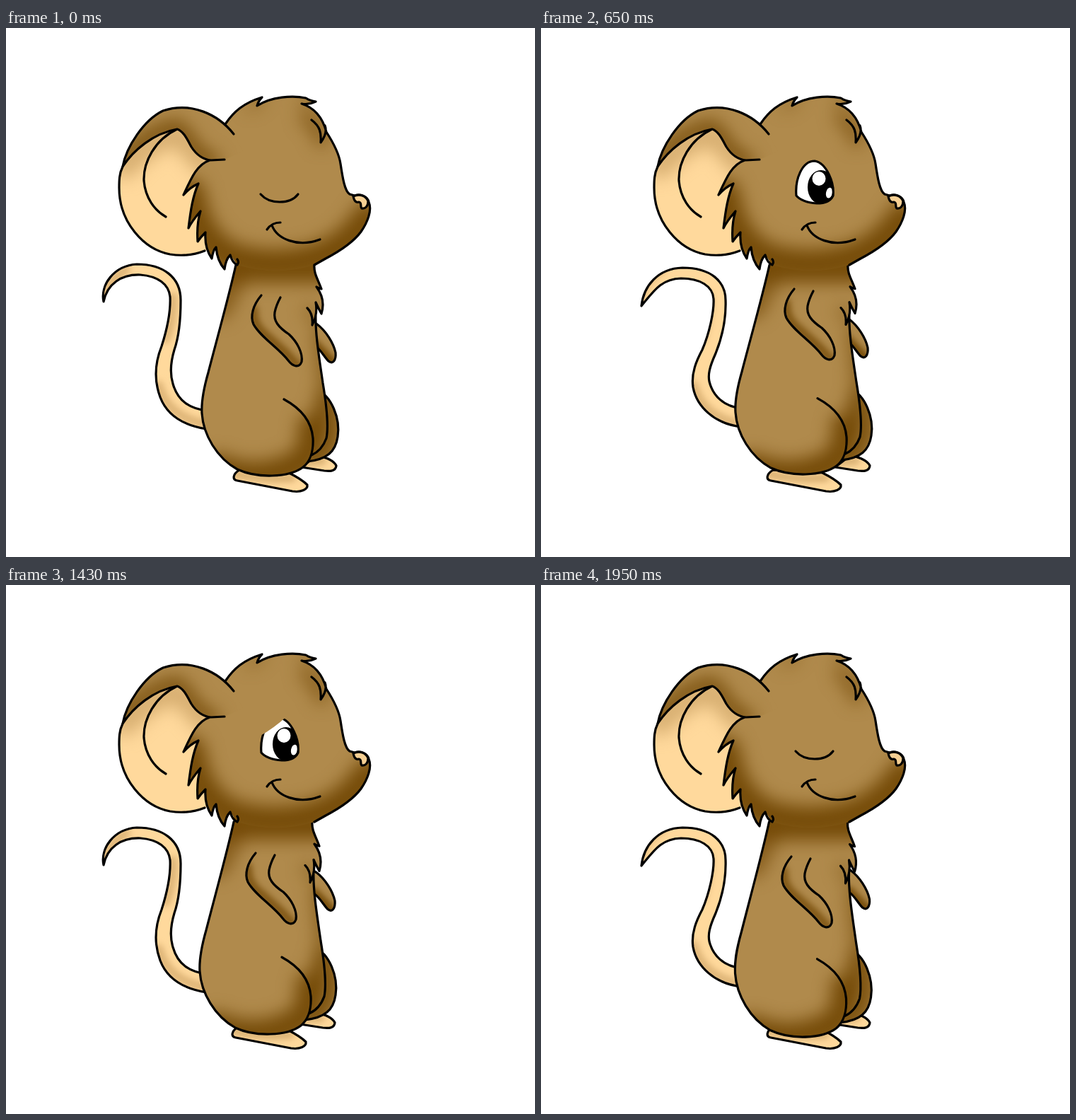
Write an HTML page that moves like this. It is 748x748 px and loops after 2080 ms.

```html
<!DOCTYPE html>
<html lang="en">
<head>
<meta charset="utf-8">
<title>Blinking mouse</title>
<style>
  html, body { margin: 0; width: 100%; height: 100%; overflow: hidden; background: #fff; }
  svg { display: block; width: 100vw; height: 100vh; }
  path, ellipse { stroke-linecap: round; stroke-linejoin: round; }
  .line { fill: none; stroke: #000; stroke-width: 3.2; }
</style>
</head>
<body>
<svg id="stage" viewBox="0 0 748 748"></svg>
<script>
const FUR = '#b08a4c', DARK = '#754b08', SKIN = '#ffd99c', TAN = '#c99f62';
const STEP = 130, COUNT = 16;
let clips = 0;

const line = d => `<path class="line" d="${d}"/>`;
const shade = (d, width, color = DARK, opacity = 1) =>
  `<path d="${d}" fill="none" stroke="${color}" stroke-width="${width}" opacity="${opacity}"/>`;
const group = (id, content) => `<g id="${id}">${content}</g>`;

// Fill and blurred shading are clipped together, then the outline goes on top.
function shape(d, fill, shades = '', outline = d, blur = 'soft') {
  const id = 'clip' + clips++;
  return `<clipPath id="${id}"><path d="${d}"/></clipPath>
    <g clip-path="url(#${id})"><rect width="748" height="748" fill="${fill}"/>
    <g filter="url(#${blur})">${shades}</g></g>${line(outline)}`;
}
const blurFilter = (id, size) =>
  `<filter id="${id}" filterUnits="userSpaceOnUse" x="0" y="0" width="748" height="748"
    color-interpolation-filters="sRGB"><feGaussianBlur stdDeviation="${size}"/></filter>`;

const tails = [
  'M284 567C250 562 228 548 218 522C208 495 212 470 220 450C228 425 233 400 232 380C230 362 215 351 190 349C163 348 143 362 138 387C133 364 152 336 185 334C222 334 247 352 247 385C247 410 245 435 238 455C232 475 232 490 236 503C243 528 260 538 284 541',
  'M284 564C245 560 220 535 215 508C212 488 220 470 228 455C238 432 245 400 244 383C243 365 225 354 198 354C170 355 160 371 142 393C145 365 165 340 200 339C240 339 261 358 261 385C262 415 255 440 247 460C238 480 236 490 238 500C243 520 258 535 284 538'
];
const tail = (d, i) => group('tail' + i, shape(d, SKIN,
  shade('M282 560Q228 550 216 505M138 388Q145 355 170 342M226 440Q238 410 236 380', 12, TAN, .65), d, 'fine'));

const farFoot = 'M440 604C455 608 464 612 467 619C466 627 458 627 450 626L418 621Z';
const nearFoot = 'M330 625C320 631 320 639 327 640L405 655C418 657 427 652 426 646C420 640 410 634 400 629Z';
const hip = 'M440 512C460 520 473 552 469 578C466 599 454 610 426 613Z';
const farArm = 'M428 412L440 419C452 428 463 445 466 459C467 470 462 476 456 471C450 465 445 455 438 450L428 445';

const tuft = 'C435 347 441 355 446 369Q442 368 439 366C448 378 450 391 446 404Q442 397 438 388';
const flank = 'C437 432 443 467 448 502C454 538 456 565 453 580C449 591 441 600 432 604';
const belly = 'C316 376 299 437 286 487C278 515 276 530 277 545C279 575 298 608 327 624C355 637 400 636 420 621';
const thigh = 'M393 525C417 538 432 555 434 580C435 598 430 613 420 621';
const bodyFill = `M325 335${belly}Q432 611 432 604C441 600 449 591 453 580C456 565 454 538 448 502C443 467 437 432 438 405L438 388Q442 397 446 404C450 391 448 378 439 366Q442 368 446 369C441 355 435 347 436 325L325 325Z`;
const bodyLines = `M325 335${belly}M436 335${tuft}C440 400 438 411 433 420C434 410 432 402 426 396M438 405${flank}${thigh}`;
const bodyShades =
  shade('M300 338H455', 44) +
  shade('M302 395L325 350', 34, DARK, .7) +
  shade('M300 622Q360 648 418 614Q438 590 432 565', 40) +
  shade('M448 525Q455 580 432 605', 22) +
  shade('M446 430L456 540', 18, DARK, .8) +
  shade('M428 398L437 412', 12, DARK, .7);

const arm = 'M361 378C349 392 345 408 350 419C360 437 385 452 399 470C405 478 414 482 418 472C420 460 412 444 400 433C385 423 378 414 380 402Q382 392 388 381';
const armShades = shade('M350 398Q348 420 368 435L398 462L413 478', 12, DARK, .85);

const ear = 'M165 196C160 206 160 216 160 226C160 275 195 313 232 320Q258 324 284 314L300 220L290 187L242 143C210 146 180 172 165 196Z';
const earLines = 'M165 196C160 206 160 216 160 226C160 275 195 313 232 320Q258 324 281 315M242 143C210 158 194 190 195 216C197 240 210 258 226 267';
const earRim = 'C300 122 262 104 222 117C195 130 170 168 165 196C180 173 208 149 242 143C251 146 256 157 262 168C269 179 279 186 290 187L309 186';
const earBack = `M322 150${earRim}L335 175Z`;

const cheek = 'C270 193 262 212 251 236C257 229 263 224 272 220C264 238 261 258 258 283C263 273 269 266 275 259C270 275 270 288 271 302C275 296 279 292 282 289C281 303 284 316 291 326C292 319 294 313 297 310C298 322 302 333 309 341C310 332 313 325 317 321C319 328 322 333 327 335';
const crown = 'C322 118 336 106 362 98Q357 103 355 110C375 97 405 95 424 99Q430 103 438 104Q428 109 418 107C437 113 448 128 453 147C464 164 471 178 473 192C476 212 479 231 486 235L493 237C502 234 511 238 513 246C518 258 511 275 502 288C491 303 471 316 452 326L436 335';
const headFill = `M310 136${crown}Q382 352 327 335L320 325L317 321C313 325 310 332 309 341C302 333 298 322 297 310C294 313 292 319 291 326C284 316 281 303 282 289C279 292 275 296 271 302C270 288 270 275 275 259C269 266 263 273 258 283C261 258 264 238 272 220C263 224 257 229 251 236C262 212 270 193 288 187L309 186L322 150Z`;
const headLines = `M310 136${crown}M288 187${cheek}Q330 331 327 327M432 130C444 139 446 148 445 162C451 154 454 146 451 138`;
const headShades =
  shade('M260 235Q268 295 312 322Q370 346 440 326Q488 308 512 268', 44) +
  shade('M425 127Q442 136 446 158', 20, DARK, .7) +
  shade('M345 112L362 99M418 104L438 105', 10, DARK, .6);

const nose = 'M491 238C500 234 509 237 512 245C512 252 508 256 503 255C500 252 504 247 499 246Q493 248 491 238Z';
const mouth = 'M369 285C373 279 379 275 388 275M376 279C383 298 412 311 444 299';
const eye = 'M361 237C359 214 369 188 387 188C404 191 415 219 413 237C409 246 400 248 390 248C377 247 366 243 361 237Z';
const eyeParts = `<clipPath id="ball"><path d="${eye}"/></clipPath><path d="${eye}" fill="#fff"/>
  <g clip-path="url(#ball)"><ellipse cx="396" cy="225" rx="19" ry="24"/></g>
  <ellipse cx="393" cy="213" rx="9.5" ry="10" fill="#fff"/>
  <ellipse cx="407.5" cy="233" rx="4.5" ry="7.5" fill="#fff" transform="rotate(12 407 233)"/>${line(eye)}`;

const stage = document.getElementById('stage');
stage.innerHTML = blurFilter('soft', 12) + blurFilter('fine', 5) +
  '<clipPath id="lid"><path id="lidEdge"/></clipPath>' +
  tails.map(tail).join('') +
  group('feet',
    shape(farFoot, SKIN, shade('M420 614L448 612', 10, TAN, .8), farFoot, 'fine') +
    shape(nearFoot, SKIN, shade('M322 630Q360 640 405 636', 10, TAN, .8), nearFoot, 'fine')) +
  group('hips', shape(hip, FUR, shade('M450 520Q470 590 428 612', 30))) +
  group('farArm', shape(farArm, FUR, shade('M436 448L462 474', 14), farArm, 'fine')) +
  group('body', shape(bodyFill, FUR, bodyShades, bodyLines)) +
  group('arm', shape(arm, 'none', armShades, arm, 'fine')) +
  shape(ear, SKIN, shade('M168 195Q205 155 245 150L280 190', 34, TAN, .75), earLines) +
  shape(headFill, FUR, headShades, headLines) +
  shape(earBack, FUR, shade('M164 192Q195 148 242 140Q257 156 270 178L292 189', 20), `M322 150${earRim}`) +
  shape(nose, '#f6d094') + line(mouth) +
  '<g clip-path="url(#lid)">' + group('eye', eyeParts) + '</g>' +
  group('closed', line('M360 235C367 243 376 246 387 246C398 246 407 243 413 235'));

const part = Object.fromEntries([...stage.querySelectorAll('[id]')].map(e => [e.id, e]));

const keys = [0, 2, 5, 9, 11, 13, 15];
const track = values => step => {
  const k = Math.max(1, keys.findIndex(key => key >= step));
  const t = (step - keys[k - 1]) / (keys[k] - keys[k - 1]);
  return values[k - 1] + (values[k] - values[k - 1]) * t;
};
const bodyX = track([0, -1, -2, -1.5, -3, -4, -2.5]);
const bodyY = track([0, 1, -2, 2, 2, 4, 6]);
const armX = track([0, -1, -3, -6, -8, -9.5, -7]);
const armY = track([0, 0, -9, -3, 1, 4, 6]);
const farX = track([0, 3.5, -4, -2, -1, 1, -1.5]);
const farY = track([0, -4, -7, -10, -12.5, -13.5, -15]);
const footX = track([0, -1, -2, -2, -2, -2, -2]);
const tailY = [0, 1, 3, 4, -1, 0, 1, 2, 3, 5, 7, 9, 1, 2, 3, 4];

// Eyelid edge heights: left, middle, right.
const lids = {
  1: [222, 258, 226], 2: [208, 249, 195], 3: [206, 222, 180], 4: [214, 196, 140],
  11: [222, 206, 150], 12: [210, 228, 186], 13: [213, 254, 198], 14: [222, 258, 226]
};

const move = (el, x, y) => el.setAttribute('transform', `translate(${x} ${y})`);
const show = (el, on) => el.setAttribute('visibility', on ? 'visible' : 'hidden');

function draw(step) {
  const pose = Math.floor(step / 4) % 2;
  tails.forEach((_, i) => {
    show(part['tail' + i], i === pose);
    move(part['tail' + i], 0, tailY[step]);
  });

  const stretch = 1 + bodyY(step) / 298;
  const bodyMove = `matrix(1 0 0 ${stretch} ${bodyX(step)} ${335 * (1 - stretch)})`;
  part.body.setAttribute('transform', bodyMove);
  part.hips.setAttribute('transform', bodyMove);
  move(part.arm, armX(step), armY(step));
  move(part.farArm, farX(step), farY(step));
  move(part.feet, footX(step), 0);

  const asleep = step === 0 || step === COUNT - 1;
  show(part.closed, asleep);
  show(part.eye, !asleep);
  const [l, m, r] = lids[step] || [150, 150, 150];
  part.lidEdge.setAttribute('d', `M340 ${l}Q385 ${m} 430 ${r}V270H340Z`);
}

let last = -1;
function tick() {
  const step = Math.floor(performance.now() / STEP) % COUNT;
  if (step !== last) draw(last = step);
  requestAnimationFrame(tick);
}
tick();
</script>
</body>
</html>
```
